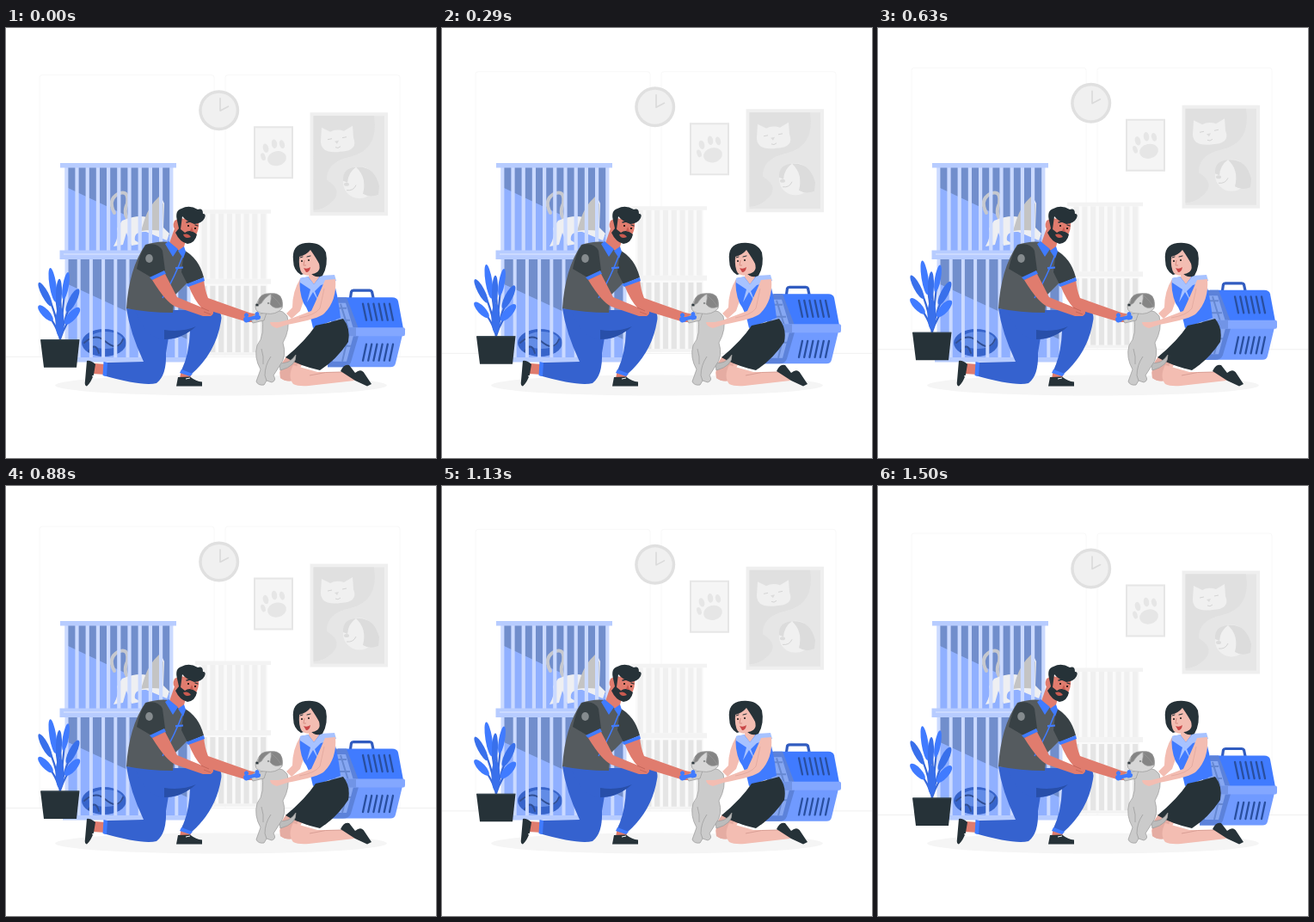
An HTML page for the animation above (1.54 s loop, 500 by 500 pixels).

```html
<!DOCTYPE html>
<html lang="en">
<head>
<meta charset="utf-8">
<title>Pet shelter</title>
<style>
  html, body { margin: 0; height: 100%; overflow: hidden; background: #fff }
  svg { display: block; width: 100vw; height: 100vh }
  .line { fill: none; stroke-linecap: round; stroke-linejoin: round }
  .dark { fill: #263238 }
  .blue { fill: #407bff }
  .man { fill: #e07c6e }
  .woman { fill: #f3bdb2 }
</style>
</head>
<body>
<svg viewBox="0 0 500 500">
  <g class="float">
    <g fill="none" stroke="#f8f8f8">
      <path d="M39 382V58Q39 55 42 55H239Q242 55 242 58V382M255 382V58Q255 55 258 55H455Q458 55 458 58V382"/>
      <path d="M0 382.5H500" stroke="#f0f0f0"/>
    </g>

    <circle cx="247.7" cy="96" r="23.5" fill="#e0e0e0"/>
    <circle cx="247.7" cy="96" r="20" fill="#f0f0f0"/>
    <path class="line" d="M249 82V96.500L258.500 91.500" stroke="#dadada" stroke-width="1.6"/>

    <path d="M288 114.500H334V175.500H288Z" fill="#e6e6e6"/>
    <path d="M290 116.500H332V173.500H290Z" fill="#f5f5f5"/>
    <g fill="#e6e6e6">
      <ellipse cx="315" cy="152" rx="11" ry="8.500" transform="rotate(-12 315 152)"/>
      <ellipse cx="299" cy="150" rx="2.600" ry="4.500" transform="rotate(-18 299 150)"/>
      <ellipse cx="302" cy="140" rx="3.200" ry="5.300" transform="rotate(-15 302 140)"/>
      <ellipse cx="312" cy="135" rx="3.200" ry="5.300" transform="rotate(-8 312 135)"/>
      <ellipse cx="321" cy="135.500" rx="3" ry="5" transform="rotate(-15 321 135.500)"/>
    </g>

    <path d="M353.500 98.500H444V218.500H353.500Z" fill="#efefef"/>
    <path d="M357.500 102.500H440V214.500H357.500Z" fill="#e6e6e6"/>
    <path d="M357.500 102.500H428Q434 142 400 150Q372 156 373 177Q394 190 377 204Q368 212 357.500 212Z" fill="#e0e0e0"/>
    <path d="M367 116L377 121Q384 117 393 120L403 114L404 128Q410 143 389 144Q366 147 366 132Z" fill="#f0f0f0"/>
    <path d="M382 132L387 131L385 135Z" fill="#dcdcdc"/>
    <g fill="none" stroke="#d4d4d4"><path d="M374 130L379 129M391 128L396 127M383 139Q386 141 389 138"/></g>
    <ellipse cx="411" cy="180" rx="19" ry="18.500" fill="#f0f0f0"/>
    <path d="M407 162Q428 160 434 184L433 194Q423 198 415 193Q420 174 407 162M392 178Q391 163 407 162Q398 168 397 180Z" fill="#dcdcdc"/>
    <ellipse cx="396" cy="182" rx="3" ry="2" fill="#dcdcdc"/>
    <path d="M396 189Q404 190 407 183" fill="none" stroke="#d4d4d4"/>

    <g id="greyCage">
      <path d="M225 215H304V378H225Z" fill="#fafafa"/>
    </g>
    <path d="M220 211.500H308V216H220ZM220 292H308V298H220ZM220 377.500H308V381H220Z" fill="#f3f3f3"/>
  </g>

  <ellipse cx="250" cy="415.500" rx="193" ry="12" fill="#f5f5f5"/>

  <g>
    <path d="M70 161H193V260H70ZM70 268H211V385H70Z" fill="#90b0ff"/>
    <path d="M70 161H193V243L70 185ZM70 268H211V362L70 297Z" fill="#718ecc"/>
    <path class="line" d="M126 215Q118 200 130 193Q143 187 141 204Q135 217 145 226" stroke="#c6c8ce" stroke-width="4"/>
    <path d="M135 224Q152 217 164 220Q168 204 180 196L184 204L183 232L190 239L187 247L163 237Q148 236 150 247L157 251L146 253L140 238L136 252L125 254Q132 242 129 233Z" fill="#eeeff2"/>
    <path d="M161 223Q166 207 178 196L183 205L182 236Q169 234 157 236Z" fill="#c4c4c4"/>
    <ellipse cx="114" cy="366" rx="26" ry="16" fill="#3764ca"/>
    <ellipse cx="116" cy="363" rx="20" ry="10" fill="#628ce6"/>
    <path class="line" d="M91 366Q104 354 115 364Q130 377 136 362M96 376Q104 364 108 378" stroke="#304f94" stroke-width="2"/>
    <g id="blueBars" fill="#cbdaff"></g>
    <path d="M63 157H198V162.500H63ZM62.500 258.500H198V269H62.500ZM66 383H213V388.500H66Z" fill="#b7ccff"/>
    <path d="M67 262H194V264H67Z" fill="#cbdaff"/>
  </g>

  <g class="float">
    <path class="line" d="M63 364Q61 324 54 290M63 364Q58 326 44 304M63 362Q56 338 43 330M63 364Q65 326 62 302M63 364Q66 324 70 293M63 362Q69 331 80 313M63 362Q69 343 80 332" stroke="#3768d9" stroke-width="2.200"/>
    <g id="leaves" class="blue"></g>
    <path class="dark" d="M40 362.500H85.500L82 395H44Z"/>
    <path d="M41 363H85" stroke="#37474f"/>
  </g>

  <g class="float">
    <path class="line" d="M400.500 314L401.500 307Q402 305.500 404 305.500H423Q425 305.500 425.500 307L427 314" stroke="#315cc0" stroke-width="3.200"/>
    <path class="blue" d="M386 313.500H449Q455 313.500 456 318L462 350H384Z"/>
    <path d="M380 357H461L453 390Q452 394.500 447 394.500H374Z" fill="#709aff"/>
    <path d="M380 313.500H396L410 350V358L401 389Q399 394.500 392 394.500H374Z" fill="#5c82da"/>
    <path d="M385 320H395L404 350V358L396 388H380Z" fill="#86a7f2"/>
    <path d="M389 321L398 350V358L391 388M396 326H386M400 340H386M401 370H385" fill="none" stroke="#6688d2" stroke-width="2"/>
    <path d="M378 348.500H462Q464 348.500 464 350.500V356Q464 358.500 462 358.500H378Z" fill="#83a7ff"/>
    <path d="M378 348.500H407V358.500H378Z" fill="#7194e6"/>
    <g id="slots" class="line" stroke="#294f9f" stroke-width="2.300"></g>
  </g>

  <g id="man">
    <path class="man" d="M103 390L116 391V403L101 402ZM204 397L216 402L213 409L202 408Z"/>
    <path class="dark" d="M94 387Q98 386 104 391L102 403Q99 412 94 416.500Q91 416 92 410ZM200 406L214 405.500Q221 411 228 411.500V416.500H198Z"/>
    <path d="M100 405L103 404M209 408L214 407" stroke="#fff"/>
    <path d="M140 326Q144 354 160 388L115 389L113 404Q159 417 175 413Q187 404 186 378L194 330Z" fill="#3562cf"/>
    <path d="M150 328H246Q252 332 250 341Q244 378 215 403L204 398Q213 380 214 352Q202 362 184 362Q163 362 150 328Z" fill="#3562cf"/>
    <path d="M184 351Q205 354 221 347Q204 362 184 362Z" fill="#284fa9"/>
    <path class="blue" d="M113.500 388L118 389L117 405L112.500 404ZM204 397L217 402L214 405L202 401Z"/>
    <path class="man" d="M212 299L230 292Q231 304 235 314Q263 324 283 331L292 333Q296 338 291 342L281 342L228 326Q219 317 212 299Z"/>
    <path d="M162 252Q178 247 190 249L207 258Q221 266 225 284L209 298L196 311L194 331Q165 331 140 326Q143 280 162 252Z" fill="#555b5f"/>
    <path d="M207 259Q224 267 230 290L211 298L204 284ZM163 252Q177 249 182 259L185 282L169 290L152 280Q156 260 163 252Z" fill="#384145"/>
    <path class="blue" d="M167 290L184 282L186 286L170 293ZM209 298L230 290L231 294L212 301Z"/>
    <ellipse cx="166.500" cy="268" rx="4.300" ry="5" fill="#858b8e"/>
    <path d="M205 266Q197 288 182 314" fill="none" stroke="#407bff" stroke-width="1.500"/>
    <path class="blue" d="M197 278L206 277.500V279.500L197 280.500Z"/>
    <path class="man" d="M196 233L209 247L205 262L190 250Z"/>
    <path class="blue" d="M189 248L200 257L194 266L185 251ZM207 254L209 260L206 268L200 259Z"/>
    <path class="man" d="M170 293L185 286Q194 303 199 313L228 325L240 328Q243 332 238 335L229 335L197 324Q186 319 170 293Z"/>
    <path d="M227 325L236 329M230 330L238 333" stroke="#ba5d52" stroke-width=".7"/>
    <path class="man" d="M202 221L224 224Q225 235 220 242L208 246L199 237Q192 232 196 224Z"/>
    <path class="dark" d="M199 224Q196 212 204 210Q213 205 223 211Q229 209 229 216Q233 216 231 221Q228 227 219 228Q210 225 205 219L203 234L208 238Q214 233 222 240Q220 250 211 251Q202 249 197 238L201 233Z"/>
    <path d="M206 240Q212 238 215 243Q208 246 206 240Z" fill="#c95a50"/>
    <path class="line" d="M210 226L214 225M220 229L223 230" stroke="#263238" stroke-width="1.300"/>
    <circle cx="212" cy="230" r="1"/><circle cx="220" cy="233" r="1"/>
    <path d="M216 231L218 237L214 236Z" fill="#c95a50"/>
  </g>

  <g id="woman">
    <path class="woman" d="M342 292Q333 306 333 325L326 332L332 338L342 329L350 306Z"/>
    <path class="woman" d="M326 382Q316 394 319 407Q326 412 334 410L346 388Z"/>
    <path d="M326 382Q317 394 319 407Q326 412 332 410L340 389Z" fill="#e5aca2"/>
    <path class="woman" d="M334 392Q327 405 334 414Q340 417 352 416L405 410L402 400L362 400Z"/>
    <path d="M353 404Q371 399 391 400" fill="none" stroke="#d99f95"/>
    <path class="dark" d="M389 399Q393 390 399 392L406 401Q413 395 417 402L425 414L420 416.500L406 410Z"/>
    <path class="blue" d="M342 291L354 289L379 288Q386 309 389 337L357 349Q353 329 346 320Q340 305 342 291Z"/>
    <path class="dark" d="M360 346Q375 343 392 338Q401 349 398 365Q384 386 365 398Q342 393 325 383Q348 364 360 346Z"/>
    <path class="woman" d="M352 281L363 280L364 290L358 298L352 290Z"/>
    <path d="M351 289L358 298L366 288L382 287L384 294L366 299L359 306L364 319L357 307L350 319L354 304L342 296V291Z" fill="#a7c2ff"/>
    <path class="dark" d="M334 270Q332 252 348 250Q366 248 372 261Q375 276 368 288Q360 292 353 284L343 287Q334 282 334 270Z"/>
    <path class="woman" d="M341 266Q349 264 354 258Q361 268 364 274Q367 284 356 286Q350 290 344 285Q340 279 341 266Z"/>
    <path d="M346 279Q350 281 354 278Q353 284 349 284Z" fill="#c94747"/>
    <path class="line" d="M342 267L345 266M350 266L354 265" stroke="#263238"/>
    <circle cx="344" cy="271" r=".9"/><circle cx="352" cy="270" r=".9"/>
    <path d="M347 270L346 276L349 276" fill="none" stroke="#d78d82"/>
  </g>

  <g id="dog" stroke="#999" stroke-width=".7" stroke-linejoin="round">
    <path d="M317 389Q329 392 337 380Q338 393 319 398Z" fill="#bcbcbc"/>
    <path d="M297 333Q318 322 327 335Q331 350 322 366Q327 382 318 393L311 404Q315 410 309 412L303 410L300 415Q293 416 291 411L296 397Q288 383 292 369Q302 357 297 333Z" fill="#cbcbcb"/>
    <path d="M308 382Q301 392 301 404L303 410M297 373Q300 382 299 391" fill="none"/>
    <path d="M300 340L287 343Q282 337 290 333L303 331Z" fill="#cbcbcb"/>
    <path d="M294 315Q300 307 313 309Q324 315 321 326Q314 334 302 332Q290 332 290 324Z" fill="#d7d7d7"/>
    <path d="M308 309Q323 307 321 324Q312 328 307 321Q309 314 308 309ZM294 317Q295 308 308 309Q300 314 297 320Q291 324 294 317Z" fill="#858585"/>
    <path d="M309 311Q316 317 321 325" fill="none"/>
    <circle cx="305" cy="320" r=".8" fill="#263238"/>
    <ellipse cx="292" cy="322" rx="2" ry="1.500" fill="#263238"/>
  </g>
  <path class="line" d="M280 339L292 336" stroke="#407bff" stroke-width="4"/>
  <path class="blue" d="M278 336a2.500 2.500 0 1 1 3 0a2.500 2.500 0 1 1 0 6a2.500 2.500 0 1 1-3-6M290 334a2.500 2.500 0 1 1 4 0a2.500 2.500 0 1 1-1 5a2.500 2.500 0 1 1-3-5"/>
  <path class="woman" d="M371 293L383 292Q385 317 370 332Q364 338 327 345L315 349Q307 347 307 342L317 342L326 340L355 329Q362 314 371 293Z"/>
  <path d="M370 303L365 326Q359 334 341 337" fill="none" stroke="#dda49a" stroke-width=".7"/>
</svg>
<script>
  const draw = (id, markup) => document.getElementById(id).innerHTML += markup;
  const repeat = (count, make) => Array.from({ length: count }, (_, i) => make(i)).join('');
  const rect = (x, y, w, h, fill = '') =>
    `<rect x="${x}" y="${y}" width="${w}" height="${h}"${fill && ` fill="${fill}"`}/>`;

  draw('blueBars', repeat(11, i =>
    rect(68.2 + i * 12.2, 161, 4.2, 98) + rect(68.5 + i * 14.2, 268, 4, 116)));
  draw('greyCage', repeat(8, i =>
    rect(227.5 + i * 9.8, 216, 6.2, 76, '#f0f0f0') + rect(227.5 + i * 9.8, 300, 6.2, 77.5, '#e5e5e5')));
  draw('slots', repeat(6, i => {
    const x = 415 + i * 6.2;
    return `<path d="M${x} 321L${x + 4} 340M${x + 4} 368L${x} 387"/>`;
  }));

  // Leaf center, length, width and tilt
  const leaves = [
    [54.5, 299, 40, 8, -9], [45.5, 310, 31, 8, -28], [46, 332, 24, 9, -43],
    [61.5, 309, 34, 7, 2], [69.5, 300, 32, 7, 10], [77.5, 317, 30, 9, 27],
    [77, 335, 25, 10, 42], [62.5, 342, 35, 10, 0]
  ];
  draw('leaves', leaves.map(([x, y, length, width, tilt], i) =>
    `<ellipse cx="${x}" cy="${y}" rx="${width / 2}" ry="${length / 2}"
      transform="rotate(${tilt} ${x} ${y})"${i % 2 ? ' fill="#3970eb"' : ''}/>`).join(''));

  const LOOP = 1540, PEAK = 728, HALF = 750, RISE = 10;
  const floating = document.querySelectorAll('.float');

  function frame(now) {
    const t = now % LOOP;
    const lift = RISE * Math.max(0, 1 - Math.abs(t - PEAK) / HALF);
    floating.forEach(part => part.setAttribute('transform', `translate(0 ${-lift})`));
    requestAnimationFrame(frame);
  }
  frame(performance.now());
</script>
</body>
</html>
```
